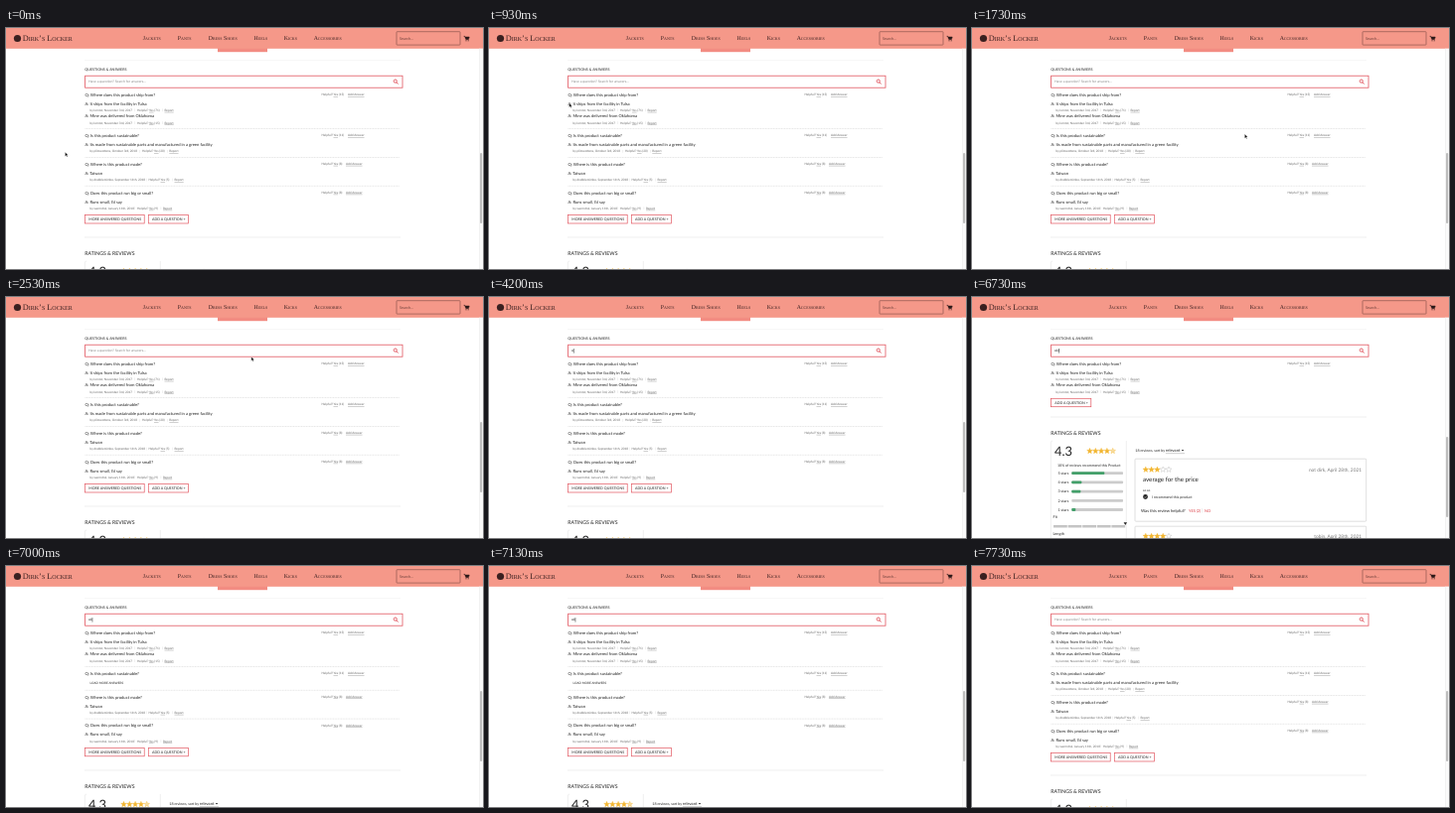
These frames come from a looping animation (480 px wide and 243 px high, 8 s). An HTML page:

```html
<!DOCTYPE html>
<html lang="en">
<head>
<meta charset="utf-8">
<title>Product questions</title>
<style>
  html, body { margin: 0; width: 100%; height: 100%; overflow: hidden; background: #fff; }
  svg { display: block; width: 100vw; height: 100vh; }
  text { font-family: Lato, "Open Sans", sans-serif; text-rendering: geometricPrecision; white-space: pre; }
  .serif { font-family: "Liberation Serif", "Noto Serif", serif; font-variant: small-caps; }
  .link { text-decoration: underline; text-decoration-thickness: .25px; }
</style>
</head>
<body>
<svg id="stage" viewBox="0 0 480 243"></svg>
<script>
const LOOP = 8000, STEP = 1000 / 15;
const INK = '#222', GRAY = '#666', RED = '#e2555f', GOLD = '#f2b632';
const stage = document.getElementById('stage');

function add(parent, tag, attrs = {}) {
  const node = document.createElementNS('http://www.w3.org/2000/svg', tag);
  for (const name in attrs) node.setAttribute(name, attrs[name]);
  parent.append(node);
  return node;
}
const group = parent => add(parent, 'g');
const rect = (parent, x, y, width, height, attrs) =>
  add(parent, 'rect', { x, y, width, height, ...attrs });
const path = (parent, d, attrs) => add(parent, 'path', { d, ...attrs });

// Text is placed by the vertical middle of its capitals.
function text(parent, x, middle, size, content, attrs) {
  const node = add(parent, 'text', { x, y: middle + size * .35, 'font-size': size, fill: INK, ...attrs });
  node.textContent = content;
  return node;
}

function helpful(parent, x, y, count) {
  const node = text(parent, x, y, 3.1, 'Helpful? ', { fill: GRAY });
  const yes = add(node, 'tspan', { class: 'link' });
  yes.textContent = 'Yes';
  add(node, 'tspan').textContent = ` (${count})`;
}

function question(parent, y, content, count, linkX) {
  text(parent, 79.5, y, 4.17, 'Q: ' + content);
  helpful(parent, 317.5, y - .5, count);
  text(parent, linkX, y - .5, 3.1, 'Add Answer', { fill: GRAY, class: 'link' });
}

function answer(parent, y, content, author, count, helpfulX, reportX) {
  text(parent, 79.5, y, 4.17, 'A: ' + content);
  text(parent, 84.5, y + 6.6, 3.1, 'by ' + author, { fill: GRAY });
  helpful(parent, helpfulX, y + 6.6, count);
  text(parent, reportX, y + 6.6, 3.1, 'Report', { fill: GRAY, class: 'link' });
  for (const x of [helpfulX - 2.4, reportX - 2.2])
    rect(parent, x, y + 5.2, .3, 2.8, { fill: '#ccc' });
}

function separator(parent, y) {
  path(parent, `M79.5 ${y}H396`, { stroke: '#ccc', 'stroke-width': .5, 'stroke-dasharray': '1 .6' });
}

function button(parent, x, middle, width, label) {
  rect(parent, x, middle - 4.2, width, 8.4, { fill: '#fff', stroke: RED, 'stroke-width': .7 });
  text(parent, x + 3.7, middle, 3.64, label);
}

function stars(parent, x, y, score) {
  for (let i = 0; i < 5; i++) {
    let d = '';
    for (let k = 0; k < 10; k++) {
      const r = k % 2 ? 1.35 : 3, a = k * Math.PI / 5 - Math.PI / 2;
      d += (k ? 'L' : 'M') + (x + 3 + i * 5.8 + r * Math.cos(a)) + ' ' + (y + r * Math.sin(a));
    }
    const fill = i + 1 <= score ? GOLD : i < score ? '#f8dda0' : '#fff';
    path(parent, d + 'Z', { fill, stroke: i < score ? GOLD : '#aaa', 'stroke-width': .35 });
  }
}

function drawHeader() {
  rect(stage, 213, 20, 50, 4.2, { fill: '#f28c82' });
  rect(stage, 0, 0, 480, 20.8, { fill: '#f59889' });
  add(stage, 'circle', { cx: 11.5, cy: 10.5, r: 3.6, fill: '#3a2020' });
  text(stage, 16.8, 10.2, 8.3, 'Dirk’s Locker', { class: 'serif', fill: '#3a2020' });
  const nav = [[137.8, 'Jackets'], [172.8, 'Pants'], [203.8, 'Dress Shoes'],
    [249.5, 'Heels'], [279.7, 'Kicks'], [309.7, 'Accessories']];
  for (const [x, label] of nav) text(stage, x, 10.4, 5.8, label, { class: 'serif', fill: '#3a2020' });
  rect(stage, 393, 3.7, 64, 13.4, { fill: 'none', stroke: '#7d4a44', 'stroke-width': .6, rx: .6 });
  text(stage, 396, 10.4, 3.8, 'Search...', { fill: '#6d403b' });
  path(stage, 'M460.6 8.3h1l1.2 3.2h2.6l.8-2.4h-4.2', { fill: '#2a1818', stroke: '#2a1818', 'stroke-width': .6 });
  for (const cx of [463, 465.2]) add(stage, 'circle', { cx, cy: 12.8, r: .55, fill: '#2a1818' });
  path(stage, 'M79 32.5H397', { stroke: '#eee', 'stroke-width': .5 });
}

function drawReviews(g) {
  path(g, 'M79 121H397', { stroke: '#ddd', 'stroke-width': .5 });
  text(g, 79.3, 137, 5.2, 'RATINGS & REVIEWS');
  path(g, 'M79.3 250V147Q79.3 145 81 145M155.3 145V250', { fill: 'none', stroke: '#e4e4e4', 'stroke-width': .6 });
  text(g, 83, 155.5, 12.9, '4.3');
  stars(g, 115.5, 155.3, 4.3);
  text(g, 86, 169.5, 3.58, '10% of reviews recommend this Product');
  [33, 10, 9, 0, 4].forEach((width, i) => {
    const y = 177.7 + i * 9.2;
    text(g, 86.5, y, 3.7, `${5 - i} stars`);
    rect(g, 100.3, y - 1.4, 51.7, 2.8, { fill: '#ccc', rx: .8 });
    rect(g, 100.3, y - 1.4, width, 2.8, { fill: '#43a06a', rx: .8 });
  });
  text(g, 81.5, 222, 3.8, 'Fit');
  for (let i = 0; i < 5; i++) rect(g, 82 + i * 14.6, 230, 13.8, 2.5, { fill: '#c4c4c4' });
  path(g, 'M152.6 227.2h3.4l-1.7 2.8Z', { fill: INK });
  text(g, 81.5, 239, 3.8, 'Length');

  text(g, 164.3, 154.8, 3.6, '18 reviews, sort by');
  text(g, 194.8, 154.3, 4.15, 'relevant');
  path(g, 'M194.8 157.7H214', { stroke: '#888', 'stroke-width': .4 });
  path(g, 'M210.8 154h2.4l-1.2 1.4Z', { fill: INK });

  const card = { fill: '#fff', stroke: '#ccc', 'stroke-width': .6, rx: .8 };
  const byline = { fill: '#777', 'text-anchor': 'end' };
  rect(g, 164, 163.2, 232.7, 63, card);
  stars(g, 171.8, 174, 3);
  text(g, 392, 174, 4.8, 'not dirk, April 28th, 2021', byline);
  text(g, 172, 184, 6.2, 'average for the price');
  text(g, 172, 194.6, 3.2, 'so so');
  add(g, 'circle', { cx: 174.5, cy: 201.5, r: 2.4, fill: INK });
  path(g, 'M173.3 201.6l.9.9 1.6-1.8', { fill: 'none', stroke: '#fff', 'stroke-width': .5 });
  text(g, 181, 201.5, 3.6, 'I recommend this product');
  text(g, 170, 215.5, 4.2, 'Was this review helpful?');
  text(g, 218, 215.3, 3.9, 'YES (2)', { fill: '#d9363e' });
  text(g, 234, 215.3, 3.9, 'NO', { fill: '#d9363e' });
  rect(g, 231.7, 213, .3, 4.6, { fill: '#ccc' });
  rect(g, 164, 231.2, 232.7, 63, card);
  stars(g, 171.8, 241.2, 4);
  text(g, 392, 241.2, 4.8, 'tobin, April 28th, 2021', byline);
}

drawHeader();

text(stage, 79.3, 41.5, 3.65, 'QUESTIONS & ANSWERS');
rect(stage, 79.6, 48.2, 319.4, 12, { fill: '#fff', stroke: RED, 'stroke-width': .8 });
add(stage, 'circle', { cx: 391.8, cy: 53.6, r: 1.6, fill: 'none', stroke: '#dc3d48', 'stroke-width': .8 });
path(stage, 'M393 54.8l1.7 1.7', { stroke: '#dc3d48', 'stroke-width': .9 });
const placeholder = text(stage, 83, 54.2, 3.44, 'Have a question? Search for answers…', { fill: '#888' });
const typed = text(stage, 83, 54.2, 3.44, '');
const caret = rect(stage, 83, 52, .5, 4.6, { fill: INK });

const first = group(stage);
question(first, 67.5, 'Where does this product ship from?', 15, 344);
answer(first, 76.2, 'It ships from the facility in Tulsa', 'lorntst, November 3rd, 2017', 71, 132, 159.5);
answer(first, 89, 'Mine was delivered from Oklahoma', 'lorntst, November 3rd, 2017', 15, 132, 159.5);

const second = group(stage);
separator(second, 101.5);
question(second, 108.5, 'Is this product sustainable?', 11, 344);
const secondAnswer = group(second);
answer(secondAnswer, 117.7, 'Its made from sustainable parts and manufactured in a green facility',
  'plimwottens, October 3rd, 2018', 20, 137, 164.3);
const loadMore = text(second, 84.5, 118.3, 3.1, 'LOAD MORE ANSWERS');

const rest = group(stage);
separator(rest, 130.5);
question(rest, 137.3, 'Where is this product made?', 8, 342);
answer(rest, 146.4, 'Taiwan', 'drabblemimbo, September 11th, 2018', 5, 143.5, 169.5);
separator(rest, 159.3);
question(rest, 166.2, 'Does this product run big or small?', 8, 342);
answer(rest, 175.1, 'Runs small, I’d say', 'wermdral, January 11th, 2018', 9, 132, 158);
button(rest, 79.6, 192.8, 59.6, 'MORE ANSWERED QUESTIONS');
button(rest, 143.3, 192.8, 40.2, 'ADD A QUESTION +');

const filteredButton = group(stage);
button(filteredButton, 79.6, 106.5, 40.2, 'ADD A QUESTION +');

const reviews = group(stage);
drawReviews(reviews);

rect(stage, 476, 20.8, 4, 222.2, { fill: '#fafafa' });
rect(stage, 476, 20.8, .4, 222.2, { fill: '#e6e6e6' });
const thumb = rect(stage, 477, 126, 2.2, 71, { fill: '#bdbdbd', rx: 1.1 });

const arrow = path(stage, 'M0 0V4.1L1 3.2 1.7 4.7 2.4 4.4 1.7 2.9H3Z',
  { fill: '#000', stroke: '#fff', 'stroke-width': .3 });
const beam = path(stage, 'M232.8 50.5h2.4M234 50.5v4.6M232.8 55.1h2.4', { stroke: INK, 'stroke-width': .45 });

const typing = [[0, ''], [4070, 'o'], [4670, 'ok'], [4930, 'okl'], [5070, 'okla'],
  [6670, 'okl'], [7000, 'ok'], [7200, 'o'], [7530, '']];
const caretTimes = [[3070, 3530], [4070, 5730], [6270, 7730]];
const pointer = [[465, 59.5, 125.3], [930, 80.5, 76], [1330, 103, 62], [1930, 358, 129],
  [2200, 339, 104], [2530, 247, 60.5], [2800, 234, 51]];

function pointerAt(t) {
  const last = pointer.length - 1;
  if (t <= pointer[0][0]) return pointer[0].slice(1);
  if (t >= pointer[last][0]) return pointer[last].slice(1);
  const i = pointer.findIndex(p => p[0] > t);
  const [t0, x0, y0] = pointer[i - 1], [t1, x1, y1] = pointer[i];
  const u = (t - t0) / (t1 - t0);
  return [x0 + (x1 - x0) * u, y0 + (y1 - y0) * u];
}

const show = (node, visible) => node.setAttribute('display', visible ? 'inline' : 'none');
const shift = (node, x, y) => node.setAttribute('transform', `translate(${x} ${y})`);

function render(t) {
  const value = typing.filter(([start]) => t >= start).pop()[1];
  const filtered = t >= 4930 && t < 7000;
  const collapsed = t >= 7000 && t < 7200;

  typed.textContent = value;
  show(placeholder, !value);
  show(caret, caretTimes.some(([on, off]) => t >= on && t < off));
  caret.setAttribute('x', 83 + (value ? typed.getComputedTextLength() : 0));

  show(second, !filtered);
  show(rest, !filtered);
  show(filteredButton, filtered);
  show(secondAnswer, !collapsed);
  show(loadMore, collapsed);
  shift(rest, 0, collapsed ? -5.2 : 0);
  shift(reviews, 0, filtered ? 0 : collapsed ? 85 : 90);
  thumb.setAttribute('y', filtered ? 141 : 126);
  thumb.setAttribute('height', filtered ? 81 : 71);

  const frameTime = Math.floor((t + 4) / STEP) * STEP;
  const inField = frameTime >= 2660;
  shift(arrow, ...pointerAt(frameTime));
  show(arrow, !inField);
  show(beam, inField && t < 4070);
}

const start = performance.now();
function tick() {
  render((performance.now() - start) % LOOP);
  requestAnimationFrame(tick);
}
tick();
</script>
</body>
</html>
```
